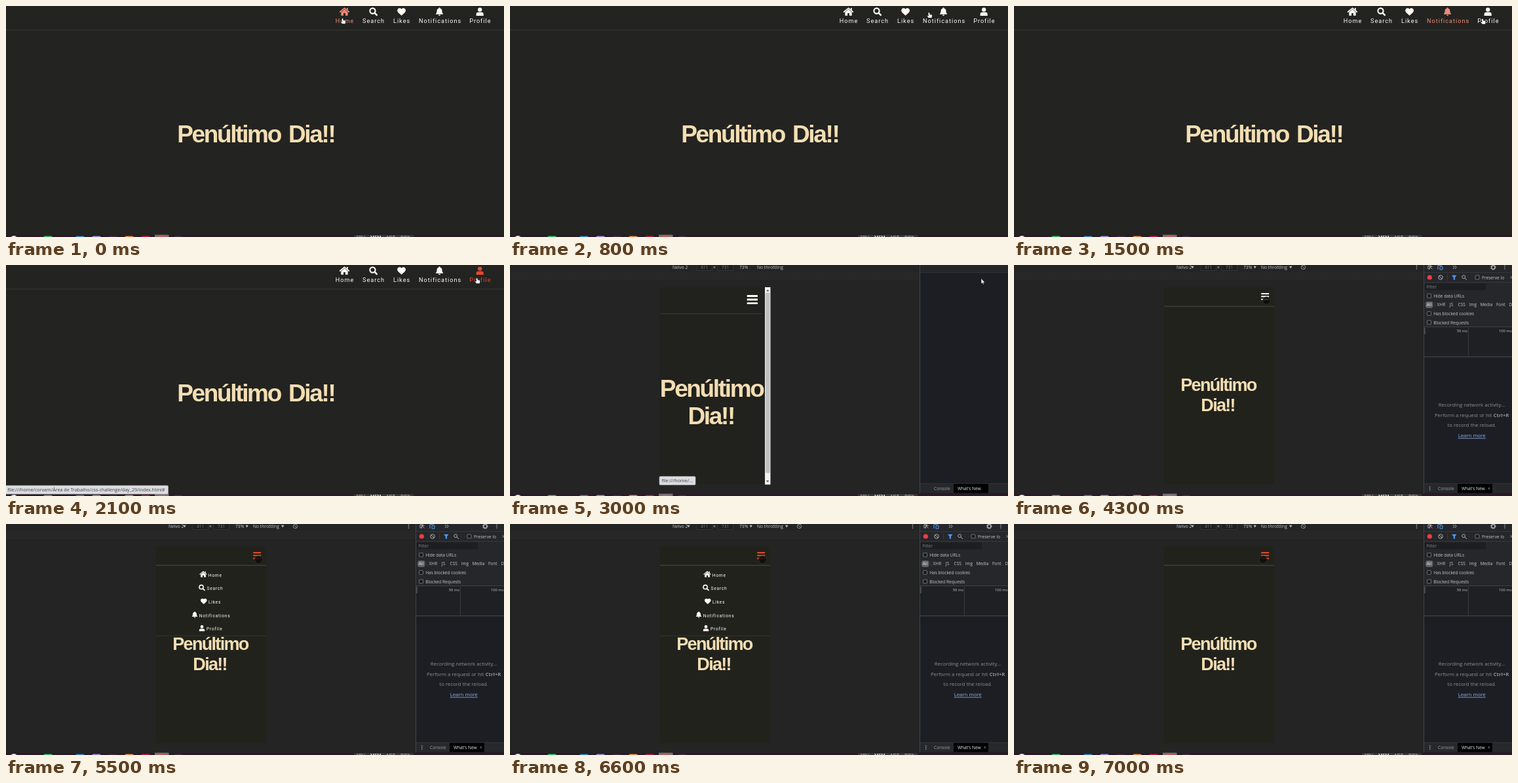
An HTML page that plays this animation: 760x354 px, repeating every 7100 ms.

```html
<!DOCTYPE html>
<html lang="pt">
<head>
<meta charset="utf-8">
<title>Penúltimo Dia</title>
<style>
html, body { margin: 0; width: 100%; height: 100%; overflow: hidden; background: #232321; }
svg { display: block; width: 760px; height: 354px; }
text { white-space: pre; }
.nav { font-family: Roboto, sans-serif; }
.title {
  font-family: "Liberation Sans", Arial, sans-serif; font-weight: 700; fill: #f3deb2;
  letter-spacing: -.0635em; word-spacing: .11em;
}
.ui { font-family: "Open Sans", "Noto Sans", sans-serif; }
</style>
</head>
<body>
<svg id="stage" viewBox="0 0 760 354" xmlns="http://www.w3.org/2000/svg"></svg>
<script>
const LOOP = 7100, STEP = 100;
const CREAM = [255, 250, 242], RED = [224, 74, 44];

const rect = (x, y, w, h, fill, more = '') =>
  `<rect x="${x}" y="${y}" width="${w}" height="${h}" fill="${fill}" ${more}/>`;
const line = (x1, y1, x2, y2, stroke, w = 1) =>
  `<path d="M${x1} ${y1}L${x2} ${y2}" stroke="${stroke}" stroke-width="${w}" fill="none"/>`;
const ui = (x, y, s, fill = '#c4c6c9', size = 6.7, more = '') =>
  `<text class="ui" x="${x}" y="${y}" font-size="${size}" fill="${fill}" ${more}>${s}</text>`;
const title = (x, y, s, size = 37) =>
  `<text class="title" x="${x}" y="${y}" font-size="${size}">${s}</text>`;
const group = (id, body, more = '') => `<g id="${id}" ${more}>${body}</g>`;
const drop = x => `<path d="M${x} 1.7h4.4l-2.2 3.8z" fill="#b9bbbe"/>`;
const dots = (x, y) => [-2.4, 0, 2.4].map(d =>
  `<circle cx="${x}" cy="${y + d}" r=".75" fill="#b9bbbe"/>`).join('');

// Icons are centred on 0,0 and take the colour of their group.
const ICONS = {
  Home: `<path d="M-6.8 .3L0-5.3 6.8 .3" fill="none" stroke="currentColor" stroke-width="1.7" stroke-linecap="round"/>
    <path d="M3.4-5.6h1.9v3.4L3.4-3.8zM0-3.7L5.2.7V6H1.4V2.4h-2.8V6H-5.2V.7z" fill="currentColor"/>`,
  Search: `<g fill="none" stroke="currentColor"><circle cx="-1.2" cy="-1.2" r="4.1" stroke-width="2.1"/>
    <path d="M2 2L5.1 5.1" stroke-width="2.6" stroke-linecap="round"/></g>`,
  Likes: `<path d="M0-4C1.6-6.4 6.4-6 6.4-1.7 6.4.8 3.4 3 0 6-3.4 3-6.4.8-6.4-1.7-6.4-6-1.6-6.4 0-4z" fill="currentColor"/>`,
  Notifications: `<path d="M-.9-6.3h1.8v1.1C3-4.6 4-3 4-1 4 1.4 4.6 2.2 5.6 3.2V4H-5.6v-.8C-4.6 2.2-4 1.4-4-1c0-2 1-3.6 3.1-4.2zM-1.6 4.8h3.2a1.6 1.6 0 0 1-3.2 0z" fill="currentColor"/>`,
  Profile: `<circle cy="-3.1" r="3.2" fill="currentColor"/>
    <path d="M-5.6 6.2V4.2Q-5.6.9-2.3.9H2.3Q5.6.9 5.6 4.2v2z" fill="currentColor"/>`
};
const icon = (name, x, y, k = 1) => `<g transform="translate(${x} ${y}) scale(${k})">${ICONS[name]}</g>`;

// name, text x, right edge, icon x, hover start, hover end, mobile text x, mobile icon x
const LINKS = [
  ['Home', 502.8, 531, 516.5, -260, 200, 308.8, 301],
  ['Search', 544.1, 578, 560.7, 270, 450, 306.5, 299],
  ['Likes', 591, 617, 603.6, 520, 630, 309, 301.8],
  ['Notifications', 630.1, 694, 661.5, 800, 1350, 294.7, 288],
  ['Profile', 707.2, 740, 723.2, 1500, 9999, 306.1, 299]
];

function desktop() {
  const links = LINKS.map(([name, x, , ix], i) => group('link' + i,
    icon(name, ix, 8.7) +
    `<text class="nav" x="${x}" y="26" font-size="9.1" letter-spacing="1" fill="currentColor">${name}</text>`)).join('');
  return rect(0, 0, 760, 354, '#232321') + rect(0, 35.5, 760, 3, '#292927') +
    line(0, 36.8, 760, 36.8, '#31312e') + links + title(261.2, 209, 'Penúltimo Dia!!');
}

function tools() {
  let ticks = '';
  for (let x = 15; x < 620; x += 42) ticks += line(x, 13, x, 22, '#2d2d2d', 0.8);
  const size = (x, n) => rect(x, -2, 23.5, 10.5, '#202020', 'stroke="#383838" stroke-width=".8"') +
    ui(x + 11.7, 6, n, '#777a7d', 6.5, 'text-anchor="middle"');
  return rect(0, 0, 626, 354, '#242424') + rect(0, 10, 625, 12, '#272727') +
    line(0, 22.4, 625, 22.4, '#2c2c2c', 0.7) + ticks +
    ui(248, 6, 'Nelvo 2') + size(285, '411') + ui(310, 6, '×') + size(317, '731') +
    ui(350, 6, '73%') + ui(377, 6, 'No throttling') +
    rect(625, 0, 135, 354, '#1d1e23') + rect(626, 0, 134, 11, '#24262a') +
    line(626, 11.5, 760, 11.5, '#3a3c40', 0.8) +
    rect(626, 335, 134, 14.5, '#27282c') + line(626, 335, 760, 335, '#3a3c40', 0.8) +
    rect(677, 335.5, 53, 14, '#000') + ui(647, 345, 'Console', '#9b9da1', 6.6) +
    ui(683, 345, "What's New", '#e4e5e7', 6.5) + line(625.5, 0, 625.5, 350, '#45474a', 0.9);
}

function panel() {
  const box = (x, y) => rect(x - 3, y - 3, 6, 6, '#1b1c1f', 'rx="1" stroke="#85878b" stroke-width=".8"');
  const check = (y, s) => box(633.5, y) + ui(640.2, y + 2.7, s, '#c4c6c9', 6.6);
  const kinds = [['XHR', 645.6], ['JS', 664.8], ['CSS', 677.6], ['Img', 694.6], ['Media', 711.5], ['Font', 736], ['D', 755.5]];
  const mid = (y, s, more = '', fill = '#8d9094') =>
    ui(698.7, y, s, fill, 7.8, 'text-anchor="middle" ' + more);
  return drop(270.3) + drop(365.5) + drop(420) + dots(614.5, 3.5) + dots(634.7, 342.5) +
    `<g fill="none" stroke="#999ca0" stroke-width=".9"><circle cx="441.5" cy="3.5" r="3.2"/><path d="M439.5 1.5l4 4"/></g>` +
    rect(626, 0, 134, 95, '#26272b') +
    `<g fill="none" stroke="#a9abae" stroke-width="1">
      <path d="M637 1h-5v5h2M634.5 2.5l4 4M634.5 2.5v4M634.5 2.5h4M670 1l2 2.5-2 2.5M673 1l2 2.5-2 2.5"/>
      <path d="M647 7V.5h6M650 2.5h4V7h-4z" stroke="#5b9cf0"/>
      <circle cx="731.3" cy="3.5" r="2.7" stroke-width="1.6"/><circle cx="731.3" cy="3.5" r="3.8" stroke-dasharray="1.5 1.5"/>
      <circle cx="651" cy="19" r="3.3"/><path d="M648.7 16.7l4.6 4.6M688 20l3 3M757.5 17l2 2-2 2"/>
      <circle cx="686.2" cy="18.2" r="2.4"/></g>` +
    dots(749, 3.5) + line(626, 11.5, 760, 11.5, '#3a3c40', 0.8) + line(661.5, 14, 661.5, 24, '#404246', 0.7) +
    `<circle cx="634.3" cy="19" r="3.6" fill="#ef3e46"/><path d="M668 15.7h7.6l-2.7 3.6v3.4h-2.2v-3.4z" fill="#4f94ee"/>` +
    box(707, 19) + ui(714, 21.6, 'Preserve lo', '#c4c6c9', 6.6) +
    line(626, 26.5, 760, 26.5, '#3a3c40', 0.8) +
    rect(627, 28.5, 93, 10, '#1d1e21') + ui(629.5, 36, 'Filter', '#7f8286') +
    check(47.3, 'Hide data URLs') + check(74.3, 'Has blocked cookies') + check(88, 'Blocked Requests') +
    rect(628, 56, 11.5, 10, '#606266', 'rx="3"') + ui(629.8, 63.4, 'All', '#eee', 6.4) +
    line(642.5, 57, 642.5, 65, '#404246', 0.7) +
    kinds.map(([s, x]) => ui(x, 63.4, s, '#c4c6c9', 6.5)).join('') +
    line(626, 95, 760, 95, '#4a4c50') + rect(626, 95.5, 134, 45, '#1f2024') +
    line(626, 140.8, 760, 140.8, '#4a4c50') + line(693.3, 96, 693.3, 140, '#45474b', 0.8) +
    line(627, 96, 627, 106, '#777', 0.9) +
    ui(692, 102.6, '50 ms', '#c4c6c9', 5.8, 'text-anchor="end"') +
    ui(759.5, 102.6, '100 ms', '#c4c6c9', 5.8, 'text-anchor="end"') +
    mid(217, 'Recording network activity…') +
    mid(233, 'Perform a request or hit <tspan font-weight="700">Ctrl+R</tspan>') +
    mid(248.4, 'to record the reload.') + mid(264.4, 'Learn more', 'text-decoration="underline"', '#8db4f4') +
    ui(723, 344.6, '×', '#aaa', 6.5);
}

const bars = (x, y, w, gap, h) => [0, 1, 2].map(i =>
  rect(x, y + i * gap, w, h, 'currentColor', 'rx=".4"')).join('');
const status = (x, y, w, s, size) =>
  rect(x - 1, y, w, 13, '#dcdde1', 'rx="1.5" stroke="#aeb0b4" stroke-width=".7"') + ui(x + 2.4, y + 9.2, s, '#3d3f43', size);

function tallPage() {
  return rect(228, 34, 161, 302, '#21211d') + line(229, 74.5, 385, 74.5, '#3a3a36') +
    `<g color="#fffdf8">${bars(361.7, 46, 16.3, 5.6, 2.9)}</g>` +
    title(228.8, 201.5, 'Penúltimo') + title(271.4, 244, 'Dia!!') +
    rect(389, 34, 8.5, 302.5, '#f1f1f1') + rect(390, 42.5, 6.5, 276, '#c1c1c1') +
    '<path d="M391 40.3l2.2-2.6 2.2 2.6zM391 330.3l2.2 2.6 2.2-2.6z" fill="#505050"/>' +
    status(229, 324, 55, 'file:///home/…', 7.2);
}

function phone() {
  const items = LINKS.map(([name, , , , , , x, ix], i) => {
    const y = 77.3 + i * 20.7;
    return icon(name, ix, y - 0.4, 0.75) +
      `<text class="nav" x="${x}" y="${y + 3.3}" font-size="6.7" letter-spacing=".73" fill="currentColor">${name}</text>`;
  }).join('');
  return rect(228, 34, 169, 302, '#22221d') + rect(229, 62.2, 167.5, 2.4, '#2c2c28') +
    line(229, 63.4, 396.5, 63.4, '#40403b') +
    group('menu', items + line(229, 171.3, 396.5, 171.3, '#363631'), 'color="#fffaf2"') +
    group('burger', bars(377.2, 42.9, 12, 4.4, 2)) +
    title(254.2, 193.3, 'Penúltimo', 27.1) + title(285.3, 224.3, 'Dia!!', 27.1);
}

function taskbar() {
  const apps = [[64, '#35c767'], [113, '#3089d2'], [138, '#9a8fe0'], [163, '#452a40'], [188, '#ee8b45'], [213, '#c8203e'], [263, '#4a2c46']];
  const loads = [['CPU', 534.5, 400], ['MEM', 556, 700], ['NET', 581, 400], ['DISK', 602, 400]];
  return rect(0, 350.8, 760, 4, '#2a1a27') + rect(227, 350.5, 21.5, 4, '#777078') +
    '<circle cx="12" cy="358" r="6" fill="#e9e5e8"/>' +
    apps.map(([x, c]) => rect(x - 7, 352.4, 14, 6, c, 'rx="2.5"')).join('') +
    rect(231, 352.4, 13, 5, '#d55a50', 'rx="2.5"') +
    rect(531, 351, 91, 4, '#3a3538') +
    loads.map(([s, x, w]) => ui(x, 357, s, '#d8d4d6', 6.8, `font-weight="${w}"`)).join('');
}

const stage = document.getElementById('stage');
const url = 'file:///home/corvam/Área de Trabalho/css-challenge/day_29/index.html#';
stage.innerHTML = group('desktop', desktop()) +
  group('tools', tools() + group('tall', tallPage()) + group('full', panel() + phone())) +
  taskbar() + group('status', status(0, 338, 248.5, url, 7.12)) +
  group('cursor',
    group('arrow', '<path d="M0 0V8.6L2 6.9 3.3 9.6 4.6 9 3.4 6.4H6z"/>') +
    group('hand', '<path d="M0 0C1-.5 1.6.2 1.8 1.2L2.2 3C3.5 2.6 5.3 3 5.6 4.4L5.4 6.8 4.8 8.6H0L-2.5 5.4C-2.4 4.6-1.4 4.5-.4 5.2L-.8 1.4Q-1 .4 0 0z"/>'),
    'fill="#fff" stroke="#111" stroke-width=".7"') +
  group('touch', '<circle r="5.8" fill="#0b0b0b" fill-opacity=".82" stroke="#3a3a36" stroke-width=".6"/>');

const el = id => document.getElementById(id);
const show = (id, on) => el(id).setAttribute('visibility', on ? 'inherit' : 'hidden');
const clamp = v => Math.max(0, Math.min(1, v));
const tint = k => `rgb(${CREAM.map((c, i) => Math.round(c + (RED[i] - c) * k))})`;

// Pointer stops: time, x, y
const PATH = [[0, 513, 19], [800, 638.8, 10], [1600, 717.8, 19.8], [2900, 718.5, 20.5], [3000, 719, 20.5],
  [3600, 664, 34], [3800, 664, 34], [4300, 385.3, 54.6], [6700, 385.3, 54.6], [7000, 380.3, 54.6]];

function pointer(t) {
  let i = 0;
  while (i < PATH.length - 2 && t >= PATH[i + 1][0]) i++;
  const [a, b] = [PATH[i], PATH[i + 1]];
  const u = clamp((t - a[0]) / (b[0] - a[0])), k = u * u * (3 - 2 * u);
  return [a[1] + (b[1] - a[1]) * k, a[2] + (b[2] - a[2]) * k];
}

function hover(t, on, off) {
  const peak = clamp((Math.min(t, off) - on) / 400);
  return clamp(peak - Math.max(0, t - off) / 400);
}

function draw(t) {
  const dev = t >= 2900, full = t >= 3200;
  show('desktop', !dev);
  show('tools', dev);
  show('tall', dev && !full);
  show('full', full);
  show('menu', full && t >= 5100 && t < 6800);
  show('status', !dev && t >= 1800);
  el('status').setAttribute('opacity', clamp((t - 1700) / 300));

  LINKS.forEach(([, , , , on, off], i) => el('link' + i).setAttribute('color', tint(hover(t, on, off))));
  el('burger').setAttribute('color', tint(hover(t, 4900, 9999)));

  const [x, y] = pointer(t);
  const touch = full && x < 397;
  const hand = !dev && LINKS.some(l => x >= l[1] && x <= l[2]);
  const at = `translate(${x.toFixed(2)} ${y.toFixed(2)})`;
  el('cursor').setAttribute('transform', at);
  el('touch').setAttribute('transform', at);
  show('touch', touch);
  show('arrow', !touch && !hand);
  show('hand', hand);
}

const start = performance.now();
function tick() {
  const t = (performance.now() - start) % LOOP;
  draw(Math.floor(t / STEP) * STEP);
  requestAnimationFrame(tick);
}
draw(0);
requestAnimationFrame(tick);
</script>
</body>
</html>
```
